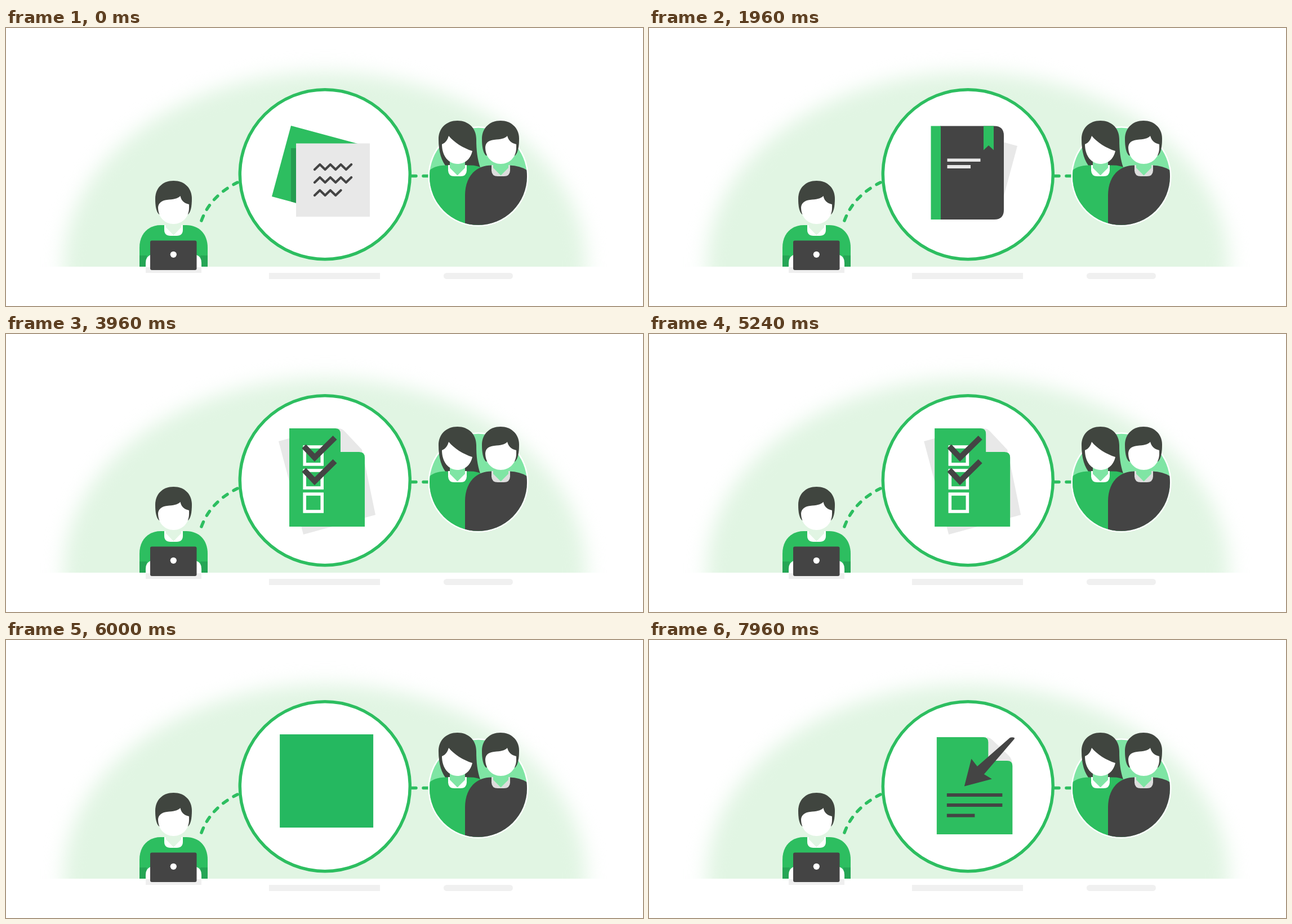
These frames come from a looping animation (1131 by 495 pixels, 8000 ms). An HTML page:

```html
<!DOCTYPE html>
<html lang="en">
<head>
<meta charset="utf-8">
<title>Sharing loop</title>
<style>
  html, body { margin: 0; width: 100%; height: 100%; overflow: hidden; background: #fff; }
  svg { display: block; width: 100%; height: 100%; }
  .g { fill: #2dbe60; }
  .d { fill: #444; }
  .h { fill: #40453f; }
  .e { fill: #e8e8e8; }
  .w { fill: #fff; }
  .m { fill: #7fe5a4; }
  .line { fill: none; stroke: #2dbe60; stroke-width: 5.5; stroke-linecap: round; }
</style>
</head>
<body>
<svg viewBox="0 0 1131 495">
  <defs>
    <filter id="soft" filterUnits="userSpaceOnUse" x="0" y="0" width="1131" height="900" color-interpolation-filters="sRGB">
      <feGaussianBlur stdDeviation="17"/>
    </filter>
    <filter id="motion" filterUnits="userSpaceOnUse" x="100" y="100" width="950" height="320" color-interpolation-filters="sRGB">
      <feGaussianBlur id="blur" stdDeviation="0 0"/>
    </filter>
    <clipPath id="ground"><rect width="1131" height="425"/></clipPath>
    <clipPath id="lens"><circle cx="566.3" cy="260.7" r="149.5"/></clipPath>
    <clipPath id="badge"><circle cx="838.5" cy="264.3" r="86.5"/></clipPath>
  </defs>

  <g clip-path="url(#ground)">
    <ellipse cx="566" cy="425" rx="464" ry="346" fill="#e1f5e3" filter="url(#soft)"/>
  </g>
  <rect x="467" y="436" width="197" height="11" fill="#f0f0f0"/>
  <rect x="777" y="436" width="123" height="11" rx="5.5" fill="#f0f0f0"/>

  <path class="line" d="M347 343Q363 299 411 275" stroke-dasharray="9 13"/>
  <path class="line" d="M720 263.5H728M741 263.5H752"/>

  <!-- person with laptop -->
  <path class="g" d="M237 425V391C237 367 252 351 275 351H320C343 351 358 367 358 391V425Z"/>
  <path d="M237 405H358V425H237Z" fill="#25a655"/>
  <path class="g" d="M250 404H345V425H250Z"/>
  <path class="w" d="M281 351H314V359Q314 370 303 370H292Q281 370 281 359Z"/>
  <path d="M284 346H311V355L297.500 369 284 355Z" fill="#e1f5e3"/>
  <path class="h" d="M265 304C265 285 278 272 297.500 272S330 285 330 304C330 318 328 328 323 332H272C267 328 265 318 265 304Z"/>
  <path class="w" d="M270 319C271 311 277 307 286 306C297 305 305 304 309.500 299C311 307 316 312 325 314V320C325 337 313 349 297.500 349S270 337 270 319Z"/>
  <rect x="248" y="425" width="99" height="11" fill="#efefef"/>
  <path class="w" d="M257 404Q248 407 248 418V426H347V418Q347 407 338 404Z"/>
  <rect class="d" x="256" y="378.500" width="82.500" height="52.500" rx="3"/>
  <circle class="w" cx="297.300" cy="403.300" r="5.600"/>

  <!-- pair of people -->
  <circle class="w" cx="838.5" cy="264.3" r="89"/>
  <circle class="m" cx="838.5" cy="264.3" r="86.500"/>
  <path class="h" d="M768 198C768 178 782 165 801.500 165S835 178 835 198C835 218 837 234 842 248H783C773 238 768 220 768 198Z"/>
  <g clip-path="url(#badge)">
    <path class="g" d="M745 356V262C752 249 766 244.500 780 244.500H824Q838 244.500 846 250V356Z"/>
    <path class="w" d="M785 244H818V253Q818 264 807 264H796Q785 264 785 253Z"/>
    <path class="m" d="M788 232H815V249L801.500 262.500 788 249Z"/>
    <path class="d" d="M815 356V298C815 267 832 244.500 862 244.500H894Q916 245 930 257V356Z"/>
    <path d="M862 244H895V253Q895 264 884 264H873Q862 264 862 253Z" fill="#ddd"/>
    <path class="m" d="M865 232H892V249L878.500 262.500 865 249Z"/>
  </g>
  <path class="w" d="M774 207C781 204 784 199 786 192C796 204 812 214 828 219C825 233 815 242 801.500 242C786 242 774 228 774 207Z"/>
  <path class="h" d="M845 197C845 178 859 165 878 165S911 178 911 197C911 211 909 222 904 227H852C847 222 845 211 845 197Z"/>
  <path class="w" d="M851 212C852 203 858 200 867 199C878 198 886 197 890 192C892 200 897 205 906 207V213C906 230 894 242 878.500 242S851 230 851 212Z"/>

  <!-- lens with sliding items -->
  <circle class="w" cx="566.3" cy="260.7" r="151"/>
  <g clip-path="url(#lens)">
    <g id="belt">
      <g class="item">
        <path class="g" d="M506 174L632 208 598 334 472 300Z"/>
        <path d="M506 214H516V312L506 309Z" fill="#259c50"/>
        <rect class="e" x="515" y="205.500" width="131" height="130.500"/>
        <path id="waves" fill="none" stroke="#444" stroke-width="4.200" stroke-linecap="round" stroke-linejoin="round"/>
      </g>
      <g class="item">
        <path class="e" d="M610 198L654 210 630 299H610Z"/>
        <path class="d" d="M517 174.500H613Q630 174.500 630 191.500V324Q630 341 613 341H517Z"/>
        <path class="g" d="M500.500 174.500H518V341H500.500ZM594 174.500H612V217.500L603 209 594 217.500Z"/>
        <path class="e" d="M529.500 232.500H588.500V238H529.500ZM529.500 244H571V250H529.500Z"/>
      </g>
      <g class="item">
        <path class="e" d="M484 191L570 168H590Q597 168 602 174L632 206 656 322 528 357Z"/>
        <path class="g" d="M503 168H585Q594 168 594 178V210H627Q637 210 637 220V343H503Z"/>
        <g id="boxes" fill="none"></g>
      </g>
      <g class="item">
        <rect x="489" y="168" width="166" height="166" fill="#25b860"/>
      </g>
      <g class="item">
        <path class="e" d="M600 173Q606 174 611 179L639 206Q645 212 645 221L602 217Z"/>
        <path class="g" d="M511 173H594Q602.500 173 602.500 182V215H636Q645.500 215 645.500 224V346H511Z"/>
        <path class="d" d="M560 260.500L572.500 211.500 583 225 641 174Q645 172.500 649 174V176L595 239 609 247.500Z"/>
        <path class="d" d="M529 273H627.500V279H529ZM529 291H627.500V297H529ZM529 309.500H578.500V315.500H529Z"/>
      </g>
    </g>
  </g>
  <circle cx="566.3" cy="260.7" r="151" fill="none" stroke="#2dbe60" stroke-width="5.500"/>
</svg>
<script>
  const LOOP = 8000, STEP = 40, GAP = 280, SPAN = 1000;
  const starts = [925, 2885, 5165, 7205];
  const rest = [0, 0, 0, 0, 6.7];
  const $ = id => document.getElementById(id);
  const items = [...document.querySelectorAll('.item')];

  const wave = (y, n) => {
    let d = `M548 ${y}`;
    for (let i = 1; i <= n; i++) d += `L${548 + 9.3 * i} ${y - (i % 2) * 9}`;
    return d;
  };
  $('waves').setAttribute('d', wave(252, 7) + wave(275, 7) + wave(298, 5));

  const box = y => `<rect x="530.2" y="${y}" width="31" height="31" stroke="#fff" stroke-width="5.6"/>`;
  const tick = y => `<path d="M529 ${y}L548 ${y + 20} 584 ${y - 15.5}" stroke="#444" stroke-width="10"/>`;
  $('boxes').innerHTML = [201, 243, 285].map(box).join('') + [200, 242].map(tick).join('');

  // cubic-bezier(.4, 0, 0, 1)
  function ease(x) {
    if (x <= 0) return 0;
    if (x >= 1) return 1;
    let lo = 0, hi = 1, s;
    for (let i = 0; i < 24; i++) {
      s = (lo + hi) / 2;
      if (1.2 * (1 - s) ** 2 * s + s ** 3 < x) lo = s; else hi = s;
    }
    return s * s * (3 - 2 * s);
  }

  const travel = t => GAP * starts.reduce((sum, a) => sum + ease((t - a) / SPAN), 0);

  function draw(t) {
    const pos = travel(t);
    items.forEach((el, i) => {
      const x = pos - i * GAP;
      el.setAttribute('transform', `translate(${(x + rest[i]).toFixed(2)} 0)`);
      el.style.display = Math.abs(x) < GAP - 0.01 ? '' : 'none';
    });
    const sigma = (travel(t + 10) - travel(t - 10)) / Math.sqrt(12);
    if (sigma > 0.25) {
      $('blur').setAttribute('stdDeviation', `${sigma.toFixed(2)} 0`);
      $('belt').setAttribute('filter', 'url(#motion)');
    } else {
      $('belt').removeAttribute('filter');
    }
  }

  const t0 = performance.now();
  function tick60() {
    const t = (performance.now() - t0) % LOOP;
    draw(Math.floor(t / STEP) * STEP);
    requestAnimationFrame(tick60);
  }
  tick60();
</script>
</body>
</html>
```
